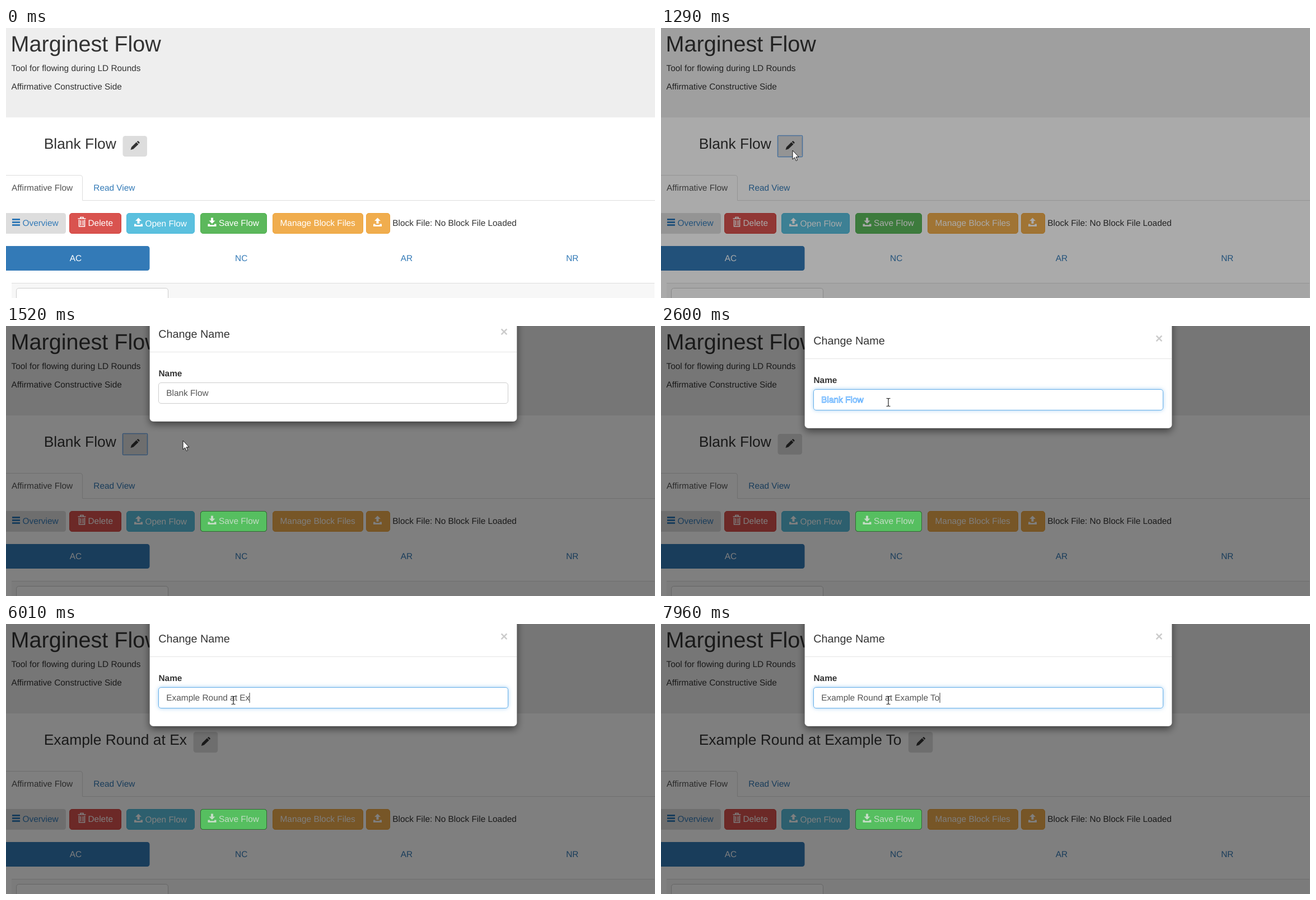
These frames come from a looping animation (1159 px wide and 483 px high, 8 s). An HTML page:

```html
<!DOCTYPE html>
<html lang="en">
<head>
<meta charset="utf-8">
<title>Rename dialog</title>
<style>
  html, body { margin: 0; width: 100%; height: 100%; overflow: hidden; background: #fff; }
  svg { display: block; width: 1159px; height: 483px; }
  text { font: 15.4px "Liberation Sans", Arial, sans-serif; fill: #333; white-space: pre; text-rendering: geometricPrecision; }
  .h1 { font-size: 39.6px; }
  .h3 { font-size: 26.4px; }
  .h4 { font-size: 19.8px; }
  .bold { font-weight: bold; }
  .mid { text-anchor: middle; }
  .link { fill: #337ab7; }
  .white { fill: #fff; }
  .gray { fill: #555; }
  .close { font-size: 23.1px; font-weight: bold; fill: #000; opacity: .2; }
  .picked { fill: #fff; stroke: #4da6ff; stroke-width: .8; }
</style>
</head>
<body>
<svg viewBox="0 0 1159 483">
  <defs>
    <path id="tray" d="M-7.5 3H-4V4.7H4V3H7.5V7.5H-7.5Z"/>
    <path id="arrow" d="M0-8 5.5-2.5H2V2.5H-2V-2.5H-5.5Z"/>
    <g id="upload"><use href="#tray"/><use href="#arrow"/></g>
    <g id="download"><use href="#tray"/><use href="#arrow" transform="translate(0 -5.5) scale(1 -1)"/></g>
    <filter id="drop" x="-10%" y="-20%" width="120%" height="150%">
      <feDropShadow dx="0" dy="5" stdDeviation="7" flood-opacity=".5"/>
    </filter>
    <filter id="glow" x="-5%" y="-50%" width="110%" height="200%">
      <feDropShadow dx="0" dy="0" stdDeviation="3.5" flood-color="#66afe9" flood-opacity=".6"/>
    </filter>
  </defs>

  <rect width="1159" height="483" fill="#fff"/>
  <rect width="1159" height="160" fill="#eee"/>
  <text class="h1" x="8.5" y="42">Marginest Flow</text>
  <text x="9.5" y="77">Tool for flowing during LD Rounds</text>
  <text x="9.5" y="109.5">Affirmative Constructive Side</text>

  <text class="h3" id="heading" x="67.7" y="216"></text>
  <g id="edit">
    <rect y="193" width="43.5" height="37" rx="4.4" fill="#ddd"/>
    <rect id="ring" x="0" y="192.5" width="44" height="38" rx="1.5" fill="none" stroke="#6fa8e6" stroke-width="1.6"/>
    <path transform="translate(22 210.5)" fill="#333" d="M-8 7.5-6.5 2.5 2.3-6.2 6-2.5-3 6ZM3.2-7 4.6-8.2Q5.3-8.7 6-8L7.8-6.2Q8.4-5.5 7.9-4.8L6.8-3.4Z"/>
  </g>

  <path d="M-2 263.5H132.1Q136.5 263.5 136.5 267.9V308.5H1159" fill="none" stroke="#ddd"/>
  <text class="gray" x="10" y="291">Affirmative Flow</text>
  <text class="link" x="156.3" y="291">Read View</text>

  <rect x="-10" y="331" width="117" height="37" rx="4.4" fill="#ddd"/>
  <path d="M11 342.5H25M11 347.5H25M11 352.5H25" stroke="#337ab7" stroke-width="2.8"/>
  <text class="link" x="29.5" y="354">Overview</text>

  <rect x="113.5" y="331.5" width="92" height="36" rx="4.4" fill="#d9534f" stroke="#d43f3a"/>
  <path d="M128.5 341H142.500M133 340.500V338.500H138V340.500M130.500 343V355H140.500V343M133.500 344V353M137.500 344V353" fill="none" stroke="#fff" stroke-width="1.6"/>
  <text class="white" x="146.500" y="354">Delete</text>

  <rect x="215.500" y="331.500" width="121" height="36" rx="4.4" fill="#5bc0de" stroke="#46b8da"/>
  <use href="#upload" x="236.500" y="347.500" fill="#fff"/>
  <text class="white" x="248.500" y="355">Open Flow</text>

  <rect id="save" x="347.500" y="331.500" width="118" height="36" rx="4.4"/>
  <use href="#download" x="368" y="347.500" fill="#fff"/>
  <text class="white" x="380" y="354">Save Flow</text>

  <rect x="476.500" y="331.500" width="161" height="36" rx="4.4" fill="#f0ad4e" stroke="#eea236"/>
  <text class="white" x="489.500" y="354">Manage Block Files</text>
  <rect x="643.500" y="331.500" width="42" height="36" rx="4.4" fill="#f0ad4e" stroke="#eea236"/>
  <use href="#upload" x="663.500" y="347.500" fill="#fff"/>
  <text x="690.300" y="354">Block File: No Block File Loaded</text>

  <rect x="-10" y="390" width="266.500" height="44" rx="4.4" fill="#337ab7"/>
  <text class="white mid" x="124.500" y="417">AC</text>
  <text class="link mid" x="420.200" y="417">NC</text>
  <text class="link mid" x="715.500" y="417">AR</text>
  <text class="link mid" x="1011.300" y="417">NR</text>

  <rect x="10" y="456" width="1148" height="27" fill="#f7f7f7"/>
  <path d="M10 456.500H1158" stroke="#ddd"/>
  <rect x="18.500" y="465.500" width="271" height="36" rx="4.4" fill="#fff" stroke="#ccc"/>

  <rect id="backdrop" width="1159" height="483"/>
  <g id="bright">
    <rect x="347.500" y="331.500" width="118" height="36" rx="4.400" fill="#56bf60" stroke="#2f6b31"/>
    <use href="#download" x="368" y="347.500" fill="#c4dcc5"/>
    <text x="380" y="354" style="fill:#c4dcc5">Save Flow</text>
  </g>

  <g id="modal">
    <rect x="256.500" y="-60" width="656" height="243" rx="6.600" fill="#fff" stroke="#000" stroke-opacity=".2" filter="url(#drop)"/>
    <text class="h4" x="272.300" y="33">Change Name</text>
    <text class="close" x="882.700" y="30">×</text>
    <path d="M257 58.500H912" stroke="#e5e5e5"/>
    <text class="bold" x="272.500" y="102">Name</text>
    <rect id="box" x="272.500" y="113.500" width="624" height="37" rx="4.400" fill="#fff"/>
    <text id="field" x="286.300" y="137"></text>
    <path id="caret" d="M.5 123V141" stroke="#333"/>
  </g>

  <path id="pointer" d="M0 0V16L3.700 12.600 6.200 18.500 8.600 17.400 6.100 11.700H11Z" fill="#fff" stroke="#000" stroke-width=".9"/>
  <path id="beam" d="M-3.500-6.500H-1L0-5.500 1-6.500H3.500M0-5.500V6.500M-3.500 7.500H-1L0 6.500 1 7.500H3.500" fill="none" stroke="#222" stroke-width="1.200"/>
</svg>
<script>
const LOOP = 8000;
const OLD_NAME = "Blank Flow";
const NEW_NAME = "Example Round at Example Tor";
const KEYS = [
  3150, 3322, 3494, 3666, 3838, 4010,
  4240, 4355, 4470, 4620, 4744, 4868, 4992, 5116, 5240,
  5470, 5650, 5830, 6010, 6080, 6280, 6480,
  6630, 6745, 6860, 7180, 7340, 7500
];
const BACKSPACE = 7960, FOCUS = 2150, SELECT = 2600, DIMMED = 1370;
// mouse stops: time, x, y
const PATH = [[360, 575, 470], [650, 405, 349], [970, 235, 219], [1370, 235, 219],
  [1520, 316, 205], [1940, 406, 136]];

const el = Object.fromEntries([...document.querySelectorAll("svg [id]")].map(n => [n.id, n]));
const ctx = document.createElement("canvas").getContext("2d");
ctx.font = '1000px "Liberation Sans", Arial, sans-serif';

const textWidth = (s, size) => ctx.measureText(s).width * size / 1000;
const clamp = v => Math.max(0, Math.min(1, v));
const show = (node, on) => node.setAttribute("visibility", on ? "visible" : "hidden");
const move = (node, x, y) => node.setAttribute("transform", `translate(${x} ${y})`);
const paint = (node, attrs) => Object.entries(attrs).forEach(([k, v]) => node.setAttribute(k, v));

const snap = t => t < 1450
  ? DIMMED + 80 * Math.floor((t - DIMMED) / 80)
  : 1450 + 70 * Math.floor((t - 1450) / 70);

function mouseAt(t) {
  const next = PATH.findIndex(p => p[0] > t);
  if (next < 0) return PATH[PATH.length - 1].slice(1);
  if (next === 0) return PATH[0].slice(1);
  const [t0, x0, y0] = PATH[next - 1], [t1, x1, y1] = PATH[next];
  const k = (t - t0) / (t1 - t0);
  return [x0 + (x1 - x0) * k, y0 + (y1 - y0) * k];
}

function nameAt(t) {
  const typed = KEYS.filter(k => k <= t).length - (t >= BACKSPACE ? 1 : 0);
  return typed ? NEW_NAME.slice(0, typed) : OLD_NAME;
}

function render(t) {
  const s = snap(t);
  const name = nameAt(t);
  const focused = t >= FOCUS;
  const selected = t >= SELECT && t < KEYS[0];

  const title = name.trimEnd();
  el.heading.textContent = title;
  move(el.edit, 67.7 + textWidth(title, 26.4) + 11.7, 0);
  show(el.ring, t >= 1130 && !focused);

  el.backdrop.setAttribute("opacity", .5 * clamp((s - 1130) / 240));
  show(el.bright, t >= DIMMED);

  const slide = clamp((s - DIMMED) / 300);
  move(el.modal, 0, -39 * (1 - slide) ** 1.7);
  el.modal.setAttribute("opacity", clamp((s - DIMMED) / 150));
  show(el.modal, t >= 1450);
  paint(el.box, { stroke: focused ? "#66afe9" : "#ccc", filter: focused ? "url(#glow)" : "none" });

  el.field.textContent = name;
  el.field.setAttribute("class", selected ? "picked" : "gray");
  move(el.caret, Math.round(286.3 + textWidth(name, 15.4)) - .5, 0);
  el.caret.setAttribute("opacity", focused && !selected ? 1 : 0);

  const [x, y] = mouseAt(s);
  const overField = t >= 1450 && y < 151;
  const overSave = t >= 360 && x > 347 && x < 466 && y > 331 && y < 368;
  move(el.pointer, x, y);
  move(el.beam, x, y);
  show(el.pointer, t >= 360 && !overField);
  show(el.beam, overField);
  paint(el.save, overSave
    ? { fill: "#449d44", stroke: "#398439" }
    : { fill: "#5cb85c", stroke: "#4cae4c" });
}

const start = performance.now();
function tick() {
  render((performance.now() - start) % LOOP);
  requestAnimationFrame(tick);
}
tick();
</script>
</body>
</html>
```
